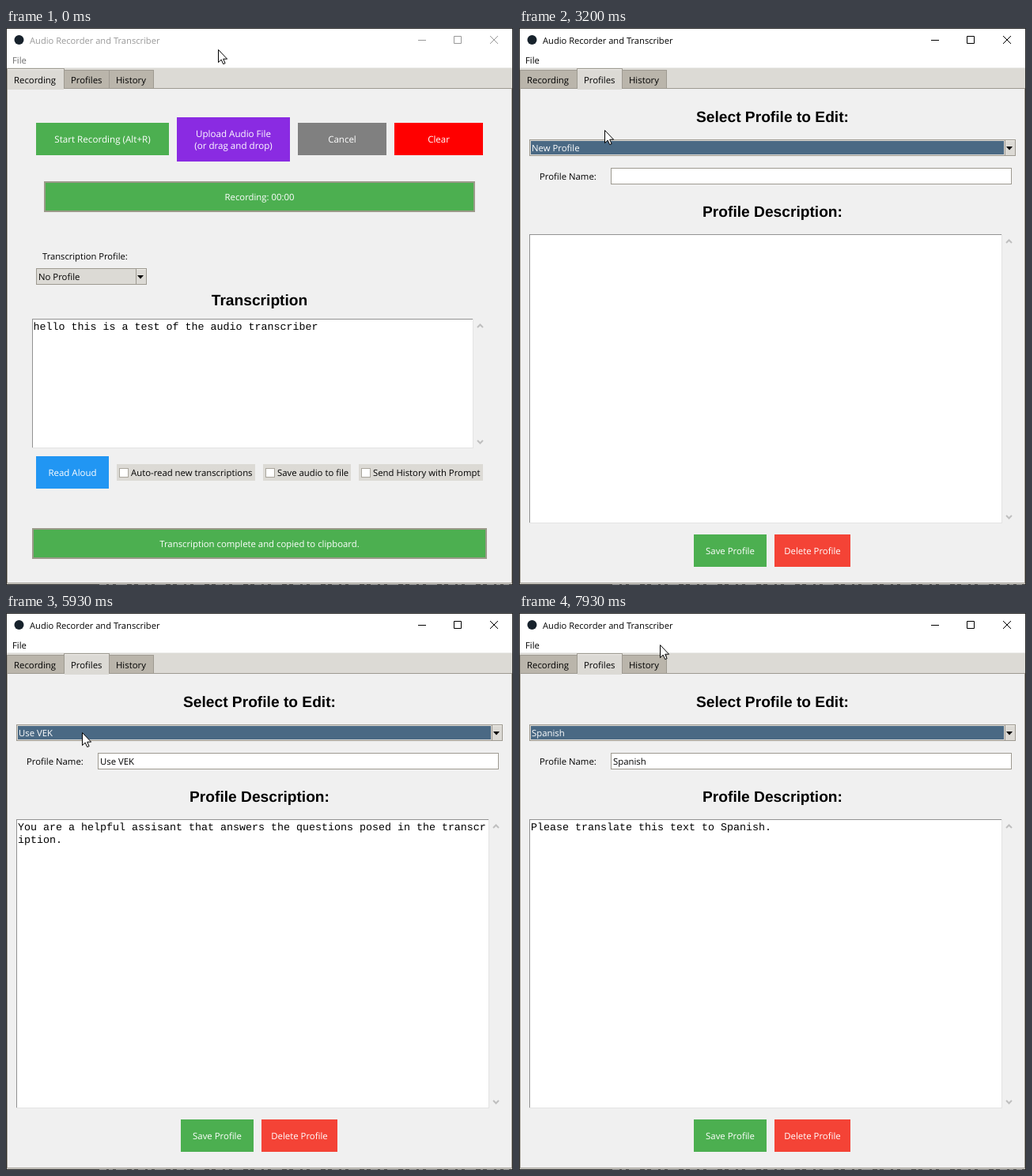
Recreate the animation shown at these times as an HTML page. Size 641x705 px, loop 8000 ms.

```html
<!DOCTYPE html>
<html lang="en">
<head>
<meta charset="utf-8">
<title>Audio Recorder and Transcriber</title>
<style>
html, body { margin: 0; width: 100%; height: 100%; overflow: hidden; background: #f0f0f0; }
svg { display: block; width: 641px; height: 705px; }
text { font: 11.35px "Open Sans", "Noto Sans", sans-serif; white-space: pre; text-rendering: geometricPrecision; }
text.head { font: bold 19.2px "Liberation Sans", Arial, sans-serif; }
text.mono { font: 13.333px "Liberation Mono", "Courier New", monospace; }
rect { shape-rendering: crispEdges; }
</style>
</head>
<body>
<svg id="stage" viewBox="0 0 641 705" xmlns="http://www.w3.org/2000/svg"></svg>
<script>
const FACE = '#dcdad5', EDGE = '#9e9a91', TAB = '#bab5ab', GREEN = '#4caf50';
const FIELD = '#4a6984', PICK = '#0078d7';

const rect = (x, y, x2, y2, fill, more = '') =>
  `<rect x="${x}" y="${y}" width="${x2 - x}" height="${y2 - y}" fill="${fill}" ${more}/>`;
const text = (x, y, s, { fill = '#000', size = 0, mid = false, cls = '', id = '' } = {}) =>
  `<text x="${x}" y="${y}" fill="${fill}" class="${cls}" id="${id}"` +
  (mid ? ' text-anchor="middle"' : '') + (size ? ` style="font-size:${size}px"` : '') + `>${s}</text>`;
const line = (d, color, width = 1, id = '') =>
  `<path id="${id}" d="${d}" fill="none" stroke="${color}" stroke-width="${width}"/>`;
const box = (x, y, x2, y2, fill, edge = EDGE, w = 1) =>
  rect(x, y, x2, y2, edge, 'rx="1"') + rect(x + w, y + w, x2 - w, y2 - w, fill);

const button = (x, y, x2, y2, fill, lines, size = 11.5) =>
  rect(x, y, x2, y2, fill) + lines.map((s, i) =>
    text((x + x2) / 2, (y + y2) / 2 + 4.5 + (i - (lines.length - 1) / 2) * 15, s,
      { fill: '#fff', mid: true, size })).join('');
const status = (x, y, x2, y2, s) =>
  box(x, y, x2, y2, GREEN, '#9a9a89', 2) +
  text((x + x2) / 2, (y + y2) / 2 + 4.5, s, { fill: '#fff', mid: true });
const head = (y, s) => text(320.5, y, s, { cls: 'head', mid: true });

const combo = (x, y, x2) =>
  box(x, y, x2, y + 21, FACE) + rect(x2 - 14, y + 1, x2 - 13, y + 20, EDGE) +
  rect(x2 - 13, y + 1, x2 - 1, y + 2, '#f0eee9') +
  `<path d="M${x2 - 12} ${y + 9}h8l-4 4.5z"/>`;

const check = (x, x2, s) =>
  rect(x, 552, x2, 573, FACE) + box(x + 3, 557, x + 15, 569, '#fff', '#aaa69d') +
  text(x + 18, 567, s);

// Sunken text area with its idle scroll arrows
const area = (x, y, x2, y2) =>
  rect(x, y, x2, y2, '#fff') + rect(x, y, x2, y + 1, '#929292') + rect(x, y, x + 1, y2, '#929292') +
  rect(x2 - 1, y, x2, y2, '#e3e3e3') + rect(x, y2 - 1, x2, y2, '#e3e3e3') +
  line(`M${x2 + 5} ${y + 11}l3.5-3.5 3.5 3.5M${x2 + 5} ${y2 - 10}l3.5 3.5 3.5-3.5`, '#bfbfbf', 2);

const tabs = active => [[1, 74, 'Recording'], [73, 131, 'Profiles'], [130, 187, 'History']]
  .map(([x, x2, s], i) => {
    const on = i === active;
    return box(x, on ? 51 : 53, x2, 77, on ? FACE : TAB) +
      (on ? rect(x + 1, 52, x2 - 1, 53, '#f2f0ec') + rect(x + 1, 75, x2 - 1, 78, FACE) : '') +
      text(x + 9, 70, s);
  }).join('');

const frame =
  rect(0, 0, 641, 705, '#2b2b2b') +
  '<path d="M118 704.5H636" stroke="#777" stroke-dasharray="9 3 5 4 14 6 3 5"/>' +
  rect(1, 1, 640, 704, '#f0f0f0') +
  rect(1, 1, 640, 50, '#fff') + rect(1, 50, 640, 77, FACE) +
  rect(1, 50, 640, 51, '#e8e8e6') +
  rect(1, 76, 640, 704, EDGE) + rect(2, 77, 639, 702, '#f0f0f0') +
  rect(1, 703, 640, 704, '#d6d4cf') +
  '<circle cx="16.5" cy="15" r="6" fill="#17222c"/>' +
  text(30, 20, 'Audio Recorder and Transcriber', { size: 11.15, id: 'title' }) +
  text(8, 45, 'File', { id: 'menu' }) +
  line('M521 15.5h10M566.5 10.5h9v9h-9zM612 10l10 10M622 10l-10 10', '#000', 1, 'controls');

const recording = tabs(0) +
  button(38, 120, 206, 161, GREEN, ['Start Recording (Alt+R)'], 11.65) +
  button(216, 113, 359, 169, '#8a2be2', ['Upload Audio File', '(or drag and drop)'], 11.6) +
  button(369, 120, 481, 161, '#808080', ['Cancel']) +
  button(491, 120, 603, 161, '#f00', ['Clear']) +
  status(48, 194, 593, 233, 'Recording: 00:00') +
  text(46, 293, 'Transcription Profile:', { size: 11.2 }) +
  combo(38, 304, 178) + text(41, 319, 'No Profile') +
  head(351, 'Transcription') +
  area(33, 368, 591, 532) +
  text(34.5, 382, 'hello this is a test of the audio transcriber', { cls: 'mono' }) +
  button(38, 542, 130, 583, '#2196f3', ['Read Aloud']) +
  check(140, 315, 'Auto-read new transcriptions') +
  check(325, 436, 'Save audio to file') +
  check(446, 603, 'Send History with Prompt') +
  status(33, 633, 608, 672, 'Transcription complete and copied to clipboard.');

const names = ['New Profile', 'Use VEK', 'Spanish'];
const notes = [
  ['', ''],
  ['You are a helpful assisant that answers the questions posed in the transcr', 'iption.'],
  ['Please translate this text to Spanish.', '']
];

const profiles = tabs(1) +
  head(119, 'Select Profile to Edit:') +
  combo(13, 141, 628) +
  rect(15, 143, 613, 160, FIELD, 'id="field"') +
  rect(15, 144, 60, 160, EDGE, 'id="mark"') +
  text(16, 156, '', { id: 'choice' }) +
  text(26, 192, 'Profile Name:') +
  box(116, 177, 623, 198, '#fff') + text(119, 192, '', { id: 'name' }) +
  head(239, 'Profile Description:') +
  area(13, 261, 611, 627) +
  text(15, 275, '', { cls: 'mono', id: 'note0' }) +
  text(15, 291, '', { cls: 'mono', id: 'note1' }) +
  button(221, 641, 313, 682, GREEN, ['Save Profile'], 11.4) +
  button(323, 641, 419, 682, '#f44336', ['Delete Profile'], 11.4) +
  '<g id="list">' + box(13, 162, 628, 214, '#fff') +
  rect(15, 164, 626, 180, PICK, 'id="pick"') +
  names.map((s, i) => text(15, 176 + i * 16, s, { id: 'item' + i })).join('') + '</g>';

const pointer = '<path id="pointer" d="M.5.5V16.6L4.2 13.1 6.7 18.6 9.1 17.6 6.7 12.2H11.6z" ' +
  'fill="#fff" stroke="#000" stroke-linejoin="round"/>';

document.getElementById('stage').innerHTML = frame +
  `<g id="recording">${recording}</g><g id="profiles">${profiles}</g>` + pointer;

const el = id => document.getElementById(id);
const show = (id, on) => el(id).setAttribute('display', on ? 'inline' : 'none');
const paint = (id, color, attr = 'fill') => el(id).setAttribute(attr, color);

// Pointer path: [tick, x, y], 15 ticks per second
const path = [
  [0, 268, 27], [5, 212, 58], [9, 148, 90], [11, 128, 94], [13, 117, 88], [19, 99, 67],
  [29, 99, 67], [34, 140, 69], [40, 183, 68], [44, 183, 68], [50, 82, 150], [54, 82, 150],
  [57, 65, 177], [60, 56, 184], [69, 56, 184], [72, 97, 250], [74, 123, 285], [75, 123, 285],
  [77, 125, 286], [79, 118, 180], [81, 111, 76], [84, 111, 76], [89, 96, 151], [90, 95, 152],
  [92, 95, 152], [95, 88, 165], [100, 88, 165], [104, 44, 202], [108, 44, 202],
  [112, 100, 289], [116, 196, 150], [119, 178, 40], [120, 178, 40]
];

// Slope that never overshoots a key
function slope(i, c) {
  if (!i || i === path.length - 1) return 0;
  const rise = j => (path[j + 1][c] - path[j][c]) / (path[j + 1][0] - path[j][0]);
  const a = rise(i - 1), b = rise(i);
  return a * b > 0 ? 2 * a * b / (a + b) : 0;
}

function along(n, c) {
  let i = 0;
  while (i < path.length - 2 && path[i + 1][0] <= n) i++;
  const p = path[i], q = path[i + 1], span = q[0] - p[0], u = (n - p[0]) / span, v = 1 - u;
  return p[c] * (1 + 2 * u) * v * v + q[c] * u * u * (3 - 2 * u) +
    span * u * v * (slope(i, c) * v - slope(i + 1, c) * u);
}

function render(t) {
  const n = Math.floor((t + 4) * 0.015) % 120;
  const x = Math.round(along(n, 1)), y = Math.round(along(n, 2));
  const active = n >= 24;
  const sel = n < 66 ? 0 : n < 107 ? 1 : 2;
  const open = (n >= 51 && n < 66) || (n >= 93 && n < 107);
  const row = y < 164 ? sel : Math.min(2, Math.floor((y - 164) / 16));

  paint('title', active ? '#000' : '#999');
  paint('menu', active ? '#000' : '#6d6d6d');
  paint('controls', active ? '#000' : '#999', 'stroke');
  show('recording', !active);
  show('profiles', active);
  show('field', !open);
  show('mark', open && sel > 0);
  show('list', open);
  paint('choice', open && !sel ? '#000' : '#fff');
  el('choice').textContent = names[sel];
  el('name').textContent = sel ? names[sel] : '';
  notes[sel].forEach((s, i) => { el('note' + i).textContent = s; });
  el('pick').setAttribute('y', 164 + row * 16);
  names.forEach((s, i) => paint('item' + i, i === row ? '#fff' : '#000'));
  el('pointer').setAttribute('transform', `translate(${x} ${y})`);
}

const start = performance.now();
function tick() {
  render((performance.now() - start) % 8000);
  requestAnimationFrame(tick);
}
tick();
</script>
</body>
</html>
```
